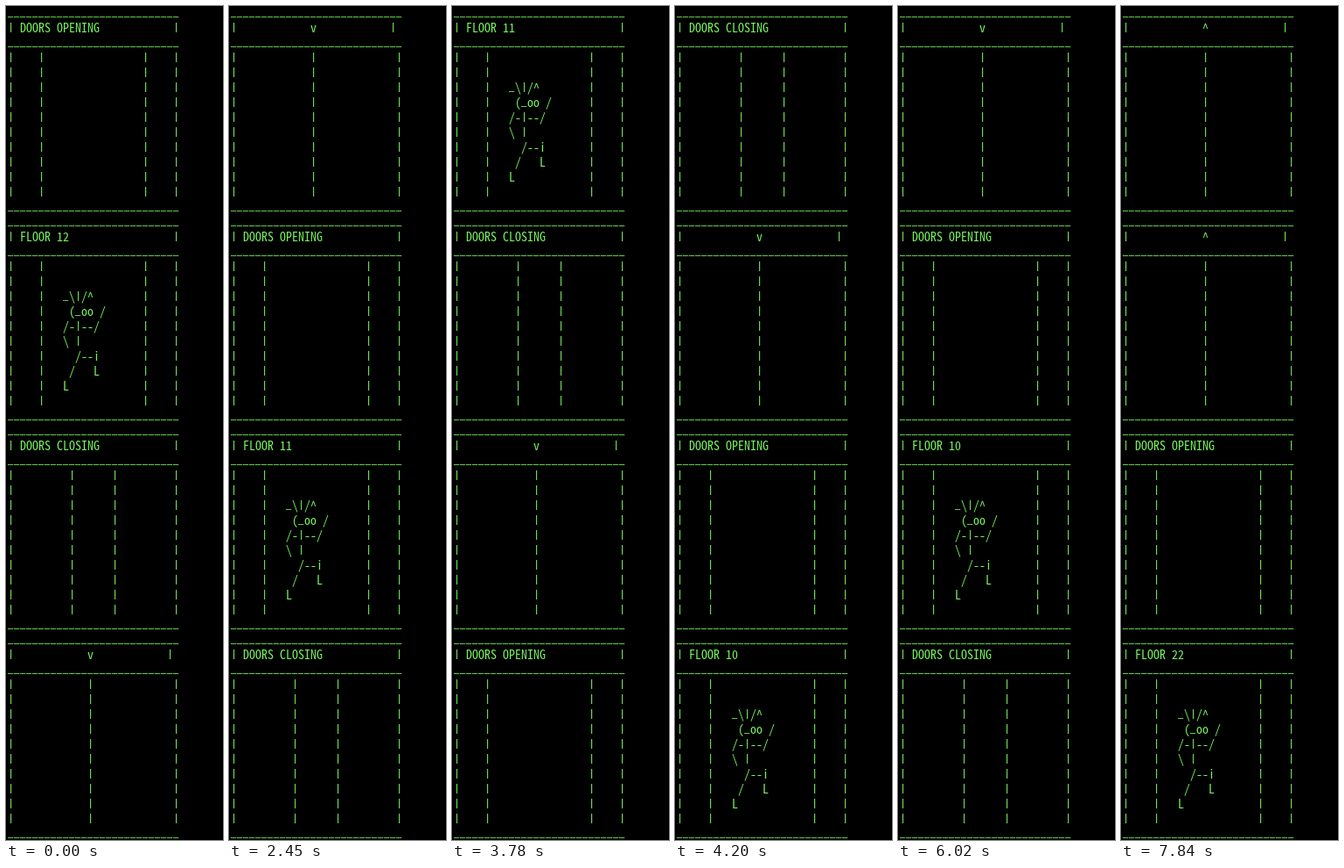
Recreate the animation shown at these times as an HTML page with a canvas. Size 248 by 950 pixels, loop 8 s.

```html
<!DOCTYPE html>
<html lang="en">
<head>
<meta charset="utf-8">
<title>Elevator</title>
<style>
html, body { margin: 0; height: 100%; overflow: hidden; background: #000; }
canvas { display: block; }
</style>
</head>
<body>
<canvas id="stage" width="248" height="950"></canvas>
<script>
const ctx = document.getElementById('stage').getContext('2d');
const CELL = 7, LINE = 17, LEFT = 2, COLS = 28, LOOP = 8000;
const UP = '^', DOWN = 'v', OPEN = 'DOORS OPENING', CLOSE = 'DOORS CLOSING';

// Panels in printing order; four are visible at a time.
const feed = [OPEN, 'FLOOR 12', CLOSE, DOWN, OPEN, 'FLOOR 11', CLOSE, DOWN,
  OPEN, 'FLOOR 10', CLOSE, UP, UP, UP, UP, OPEN, 'FLOOR 22'];

// [start time, first visible panel]
const scroll = [[0, 0], [140, 1], [630, 2], [2450, 3], [3500, 4], [3780, 5],
  [4200, 6], [6020, 7], [7070, 11], [7350, 12], [7840, 13]];

const rider = ['_\\|/^', ' (_oo /', '/-|--/', '\\ |', '  /--i', ' /   L', 'L'];

function put(text, col, row) {
  const base = 13 + row * LINE;
  [...text].forEach((ch, i) => {
    const x = LEFT + (col + i) * CELL;
    if (ch === '|') {
      ctx.fillStyle = '#69d952';
      ctx.fillRect(x + 3, base - 11, 1.2, 11);
    } else if (ch === '_') {
      ctx.fillStyle = '#62c94c';
      ctx.fillRect(x, base - 1, 6.3, 1);
    } else if (ch !== ' ') {
      ctx.fillStyle = '#76f35c';
      ctx.fillText(ch, x + CELL / 2, base);
    }
  });
}

function panel(title, top) {
  const moving = title === UP || title === DOWN;
  const doors = moving ? [13] : title === CLOSE ? [10, 17] : [5, 22];
  for (const row of [0, 2, 13]) put('_'.repeat(COLS), 0, top + row);
  put('|', 0, top + 1);
  put(title, moving ? 13 : 2, top + 1);
  put('|', moving ? 26 : 27, top + 1);
  for (let row = 3; row < 13; row++)
    for (const col of [0, ...doors, 27]) put('|', col, top + row);
  if (title.startsWith('FLOOR')) rider.forEach((line, i) => put(line, 9, top + 5 + i));
}

function draw(now) {
  const t = now % LOOP;
  const first = scroll.filter(([start]) => start <= t).pop()[1];
  ctx.fillStyle = '#000';
  ctx.fillRect(0, 0, 248, 950);
  ctx.font = '14px "Noto Sans Mono CJK JP", "Noto Sans Mono CJK SC", "Noto Sans Mono", monospace';
  ctx.textAlign = 'center';
  for (let i = 0; i < 4; i++) panel(feed[first + i], i * 14);
}

const begin = performance.now();
function tick() {
  draw(performance.now() - begin);
  requestAnimationFrame(tick);
}
tick();
</script>
</body>
</html>
```
